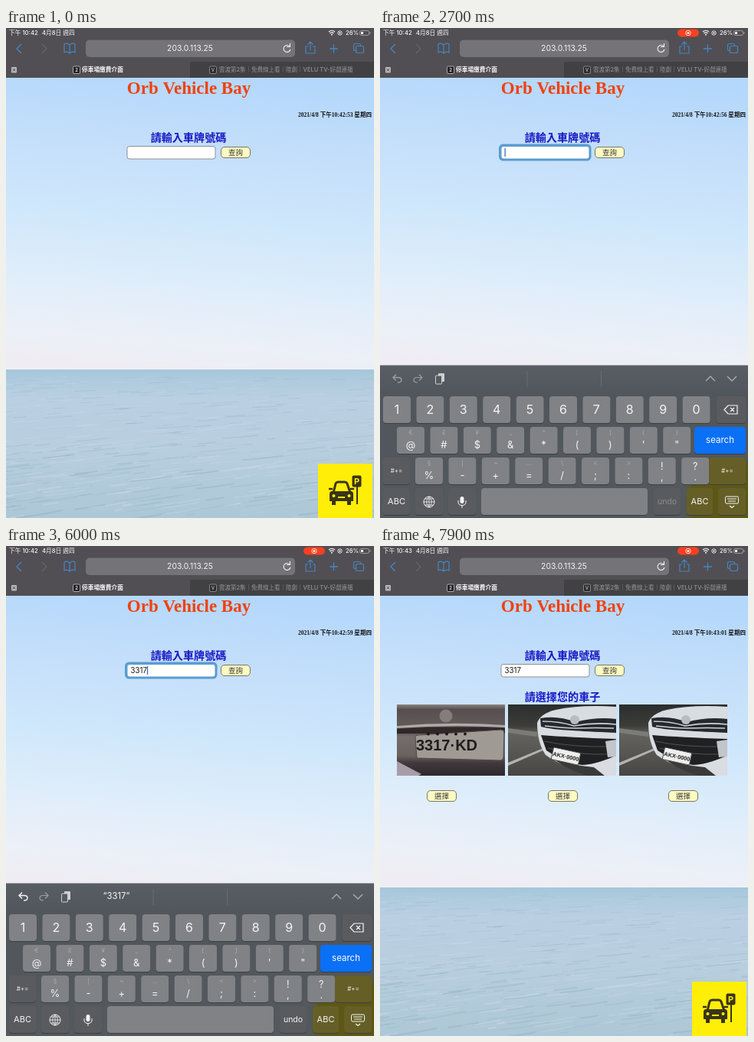
Recreate the animation shown at these times as an HTML page with a canvas. Size 480x640 px, loop 8000 ms.

```html
<!DOCTYPE html>
<html lang="zh-Hant">
<head>
<meta charset="utf-8">
<style>
html, body { margin: 0; width: 100%; height: 100%; overflow: hidden; background: #555; }
canvas { display: block; width: 480px; height: 640px; }
</style>
</head>
<body>
<canvas id="stage" width="480" height="640"></canvas>
<script>
const canvas = document.getElementById('stage');
let g = canvas.getContext('2d');
const SANS = 'Inter, "Noto Sans CJK TC", "Noto Sans CJK", sans-serif';
const SERIF = '"Liberation Serif", "Noto Sans CJK TC", "Noto Sans CJK", serif';
const PLATE = '"Liberation Sans", sans-serif';
const BAR = '#514f53', KEY = '#818286', DARK_KEY = '#5a5b5f', LIGHT = '#f5f5f7',
      BLUE = '#1818c4', YELLOW = '#ffee08', FOCUS_RING = '#5a9ccf';

// Event times in ms; the picture advances in steps of STEP
const LOOP = 8000, STEP = 100, RECORD = 500, FOCUS = 1650, SYMBOLS = 2700,
      TYPED = [4000, 4400, 4900, 5400], SEARCH = 6300, RESULT = 6700;

function text(s, x, y, size, color, align = 'center', weight = 400, family = SANS) {
  g.font = `${weight} ${size}px ${family}`;
  g.textAlign = align;
  g.textBaseline = 'middle';
  g.fillStyle = color;
  g.fillText(s, x, y);
}
function rect(x, y, w, h, color) {
  g.fillStyle = color;
  g.fillRect(x, y, w, h);
}
function round(x, y, w, h, r, fill, stroke, lw = 1) {
  g.beginPath();
  g.roundRect(x, y, w, h, r);
  if (fill) { g.fillStyle = fill; g.fill(); }
  if (stroke) { g.strokeStyle = stroke; g.lineWidth = lw; g.stroke(); }
}
function path(d, stroke, lw = 1, fill) {
  const p = new Path2D(d);
  if (fill) { g.fillStyle = fill; g.fill(p); }
  if (stroke) { g.strokeStyle = stroke; g.lineWidth = lw; g.stroke(p); }
}
const shape = (d, fill) => path(d, null, 0, fill);
function circle(x, y, r, fill, stroke, lw = 1) {
  g.beginPath();
  g.arc(x, y, r, 0, Math.PI * 2);
  if (fill) { g.fillStyle = fill; g.fill(); }
  if (stroke) { g.strokeStyle = stroke; g.lineWidth = lw; g.stroke(); }
}
function gradient(x0, y0, x1, y1, stops) {
  const gr = g.createLinearGradient(x0, y0, x1, y1);
  for (const [at, color] of stops) gr.addColorStop(at, color);
  return gr;
}
function cached(draw) {
  const layer = document.createElement('canvas');
  layer.width = 480;
  layer.height = 640;
  const main = g;
  g = layer.getContext('2d');
  draw();
  g = main;
  return layer;
}

function drawScenery() {
  rect(0, 65, 480, 382, gradient(240, 65, 208, 447, [
    [0, '#b4d8fb'], [.25, '#c5dffb'], [.5, '#d0e8fb'], [.75, '#e2eefa'],
    [.9, '#ecf0f8'], [1, '#efedf3']
  ]));
  rect(0, 446, 480, 194, gradient(0, 446, 0, 640, [
    [0, '#a5c6db'], [.07, '#aecbde'], [.2, '#bacfe2'], [.5, '#b8cfdf'], [1, '#acc7d5']
  ]));
  let seed = 11;
  const rnd = () => (seed = (seed * 16807) % 2147483647) / 2147483647;
  const tones = ['#ccd8ea', '#c3d5e5', '#a0bdd0', '#98b3c5', '#b3c8dc'];
  g.globalAlpha = .5;
  for (let i = 0; i < 620; i++) {
    const d = rnd(), y = 455 + d * 185, x = rnd() * 540 - 60;
    const len = 10 + rnd() * (18 + d * 44), rise = len * (.03 + d * .13);
    path(`M${x} ${y} q${len / 2} ${-rise * .3} ${len} ${-rise}`,
      tones[Math.floor(rnd() * tones.length)], .6 + d * 2 * rnd());
  }
  g.globalAlpha = 1;
}

function drawBadge() {
  const ink = '#3a3418';
  rect(407, 569, 71, 71, YELLOW);
  path('M427 607 L430 595 Q431 593 433 593 H442 Q444 593 445 595 L449 607', ink, 3);
  shape('M425 605 H450 Q453 605 453 609 V618 H450 V623 H445 V618 H430 V623 H425 V618 H422 V609 Q422 605 425 605 Z', ink);
  path('M421 602 h5 M449 602 h5', ink, 2.5);
  circle(427.5, 611, 2, YELLOW);
  circle(447.5, 611, 2, YELLOW);
  rect(433, 612, 9, 2, YELLOW);
  rect(457, 597, 2, 25, ink);
  round(451.5, 584.5, 12, 15, 2, ink);
  text('P', 457.5, 592.5, 11, YELLOW, 'center', 700);
}

function drawChrome() {
  const tint = '#4585c4';
  rect(0, 0, 480, 65, BAR);
  rect(240, 44, 240, 21, '#414144');
  round(104, 15.5, 273, 22.5, 5, '#737378');
  text('203.0.113.25', 240, 27, 10.3, LIGHT);
  path('M370 24 A4.5 4.5 0 1 0 371 28 M370.5 20 V24.5 H366', LIGHT, 1.1);
  path('M20 21 L14 27 L20 33', tint, 1.4);
  path('M47 21 L53 27 L47 33', '#66666b', 1.2);
  path('M83 22 Q79 19 76 21 V32 Q80 30 83 33 Q86 30 90 32 V21 Q87 19 83 22 V33', tint, 1.2);
  path('M394 24 H391 V33 H403 V24 H400 M397 29 V18 M393.5 21.5 L397 18 L400.5 21.5', tint, 1.2);
  path('M422 27 H433 M427.5 21.5 V32.5', tint, 1.3);
  round(453.5, 20.5, 9, 9, 2, null, tint, 1.2);
  round(456.5, 23.5, 10, 9, 2, BAR, tint, 1.2);
  round(7, 51, 7, 7.5, 1, '#b9b9bb');
  path('M8.8 53 l3.4 3.4 m0 -3.4 l-3.4 3.4', '#444', 1);
  round(87.5, 50, 9, 9.5, 1.5, '#222225', '#c4c4c6', .8);
  text('2', 92, 55, 6, '#eee', 'center', 600);
  text('停車場繳費介面', 99, 55, 7.7, '#fafafa', 'left', 700);
  round(265.5, 50, 9, 9.5, 1.5, '#2c2c2f', '#9a9a9d', .8);
  text('V', 270, 55, 6, '#b3b3b5', 'center', 600);
  text('雲渡第2集｜免費線上看｜陸劇｜VELU TV-好戲連播', 278, 55, 7.5, '#949497', 'left', 500);
}

function drawStatus(t) {
  text(`下午 10:${t < 6700 ? 42 : 43}`, 4, 6.5, 7.7, LIGHT, 'left', 500);
  text('4月8日 週四', 47, 6.5, 7.7, LIGHT, 'left', 500);
  if (t >= RECORD) {
    round(388, 1.5, 28, 10, 5, '#fa4020');
    circle(402, 6.5, 3.2, null, '#ffe6de', .9);
    circle(402, 6.5, 1.6, '#ffe6de');
  }
  path('M421 5 Q425 1.5 429 5 M422.5 7 Q425 4.8 427.5 7', LIGHT, 1.2);
  circle(425, 8.8, 1, LIGHT);
  circle(435.5, 6.5, 2.7, null, LIGHT, .9);
  rect(434.5, 5.5, 2, 2, LIGHT);
  text('26%', 443, 6.5, 7.7, LIGHT, 'left', 500);
  round(461.5, 3.5, 12, 6, 1.8, null, '#b0b0b4', .8);
  rect(463, 5, 3, 3, LIGHT);
  rect(474.5, 5.5, 1, 2, '#b0b0b4');
}

function button(x, y, label) {
  round(x + .5, y + .5, 38, 14, 4.5, '#fdfac2', '#77776a');
  text(label, x + 19.5, y + 8, 9.5, '#3c3a3c', 'center', 500);
}

function drawRear() {
  rect(0, 0, 141, 93, gradient(0, 0, 0, 93, [
    [0, '#8a8281'], [.07, '#574f4f'], [.28, '#625a59'], [.33, '#443c3d'],
    [.45, '#756d6b'], [.72, '#6a6261'], [.82, '#41383b'], [1, '#2e282b']
  ]));
  shape('M0 28 Q70 22 141 27 V30 Q70 26 0 31 Z', '#b1aaa7');
  shape('M0 32 Q70 28 141 31 V38 H0 Z', '#2e282a');
  circle(64, 15, 8.5, '#857d7b');
  path('M24 43 Q24 40 28 40 L136 33 Q140 33 140 37 L139 69 Q139 73 135 73 L26 70 Z', '#4f4848', 1, '#a09a94');
  for (let i = 0; i < 5; i++) circle(41 + i * 12, 38.5, 2, '#1d191b');
  text('3317·KD', 25, 54, 20, '#201d1f', 'left', 700, PLATE);
  shape('M0 74 L32 91 L28 93 H0 Z', '#a79ca8');
}

function drawFront() {
  rect(0, 0, 141, 93, gradient(0, 0, 0, 93, [
    [0, '#2b2e2d'], [.3, '#3c3d3a'], [.42, '#63625f'], [1, '#474644']
  ]));
  shape('M0 31 L38 36 V42 L0 37 Z', '#7c7b77');
  shape('M0 76 L46 57 L48 59 L0 80 Z', '#b3b2af');
  // Body, grille slats, bumper and lower intake
  shape('M38 24 Q42 12 62 7 Q95 0 141 3 V93 H109 Q72 82 49 66 Q38 50 38 24 Z', '#d9dce0');
  shape('M42 18 Q65 14 88 23 Q115 16 141 19 V37 Q98 35 84 34 Q58 33 43 29 Z', '#26292d');
  path('M45 22 Q68 22 86 28 Q112 23 141 26 M48 28 Q75 31 88 31 Q116 30 138 31', '#ccd3d9', 1.6);
  circle(87, 20, 6, '#b9bdc1');
  shape('M43 40 Q80 43 141 45 L138 68 Q112 79 96 79 Q68 73 50 60 Z', '#202123');
  path('M47 48 Q84 56 134 55 M52 57 Q86 66 132 65', '#515254', 1);
  shape('M56 68 Q82 80 112 82 L126 93 H103 Q72 83 56 68 Z', '#3a3a3a');
  shape('M127 48 L141 46 V68 L130 69 Z', '#c2c5c9');
  g.save();
  g.translate(75.5, 67.5);
  g.rotate(.21);
  round(-18, -8, 36, 16, 1, '#eeeeec', '#4b4b4b');
  text('AKX·0000', 0, 1, 7.4, '#1d1d1d', 'center', 700, PLATE);
  g.restore();
}

function photo(x, draw) {
  g.save();
  g.translate(x, 207);
  g.beginPath();
  g.rect(0, 0, 141, 93);
  g.clip();
  draw();
  g.restore();
}

function drawResults() {
  text('請選擇您的車子', 238, 197.5, 14.1, BLUE, 'center', 700);
  photo(22, drawRear);
  photo(167, drawFront);
  photo(312, drawFront);
  [61, 219, 376].forEach(x => button(x, 319, '選擇'));
}

function drawPage(t, typed) {
  text('Orb Vehicle Bay', 238.5, 80.5, 23, '#f0410f', 'center', 700, SERIF);
  const sec = 53 + Math.floor((t + 300) / 1000);
  const clock = `10:${42 + Math.floor(sec / 60)}:${String(sec % 60).padStart(2, '0')}`;
  text(`2021/4/8 下午${clock} 星期四`, 477, 114, 7.55, '#161616', 'right', 700, SERIF);
  text('請輸入車牌號碼', 238, 143.7, 14.1, BLUE, 'center', 700);
  const focused = t >= FOCUS && t < SEARCH;
  if (focused) round(156.5, 153, 117.5, 19, 4, null, FOCUS_RING, 3);
  round(158, 154.5, 115, 16.5, 3, '#fff', focused ? FOCUS_RING : '#8f8f90');
  text(typed, 162.5, 163, 9.7, '#181818', 'left');
  if (focused) {
    const x = 162.5 + g.measureText(typed).width;
    rect(x, 157, 1.3, 11, '#4168c8');
  }
  button(280, 155, '查詢');
  if (t >= RESULT) drawResults();
}

function key(x, y, w, fill, label, size = 16, color = LIGHT, dy = 0) {
  round(x, y + 1, w, 35, 4, '#3d3f42');
  round(x, y, w, 35, 4, fill);
  if (label) text(label, x + w / 2, y + 18 + dy, size, color);
}
function row(chars, hints, x, y, size) {
  [...chars].forEach((c, i) => {
    const kx = x + i * 43.4, hint = hints[i];
    key(kx, y, 36, KEY, c, size, LIGHT, hint ? 6 : 0);
    if (hint) text(hint, kx + 18, y + 8, 8, '#a9aaad');
  });
}
function shiftArrow(x, y) {
  shape(`M${x} ${y - 7} l7.5 7.5 h-4 v6 h-7 v-6 h-4 Z`, '#111');
}

function drawToolbar(typed) {
  const dim = '#9a9da1', on = typed ? LIGHT : dim;
  path('M21 452.5 L17 456.5 L21 460.5 M17 456.5 H24 Q28 456.5 28 460 Q28 463 23 463', on, 1.4);
  path('M51 452.5 L55 456.5 L51 460.5 M55 456.5 H48 Q44 456.5 44 460 Q44 463 49 463', dim, 1.2);
  round(76, 451, 8, 11, 1, '#cfd0d2');
  round(72.5, 454, 8, 11, 1, '#565b60', '#cfd0d2');
  rect(191.5, 448, 1, 21, '#676c71');
  rect(288, 448, 1, 21, '#676c71');
  if (typed) text(`“${typed}”`, 144, 458, 11.3, LIGHT);
  path('M425 461 L431 455 L437 461', '#a5a8ac', 1.5);
  path('M453 455 L459 461 L465 455', '#a5a8ac', 1.5);
}

function drawKeys(symbols, typed) {
  if (symbols) {
    row('1234567890', '', 4, 481, 16);
    row('@#$&*()\'"', '€£¥_^[]{}', 22, 521, 13);
    row('%-+=/;:', '§|~…\\<>', 46, 561, 13);
  } else {
    row('QWERTYUIOP', '1234567890', 4, 481, 16);
    row('ASDFGHJKL', '@#$&*()\'"', 22, 521, 16);
    row('ZXCVBNM', '%-+=/;:', 46, 561, 16);
  }
  [['!', ','], ['?', '.']].forEach(([top, low], i) => {
    const x = 46 + (7 + i) * 43.4;
    key(x, 561, 36, KEY);
    text(top, x + 18, 573, 12.5, LIGHT);
    text(low, x + 18, 587, 12.5, LIGHT);
  });
  key(438.5, 481, 38.5, DARK_KEY);
  path('M449 498.5 L454 493 H466 V504 H454 Z M457 496 l5 5 m0 -5 l-5 5', LIGHT, 1.2);
  key(410, 521, 67, '#0a70f5', 'search', 11.5, '#fff');
  const end = '#655f27';
  if (symbols) {
    key(4, 561, 35, DARK_KEY, '#+=', 8);
    key(429, 561, 48, end, '#+=', 8);
  } else {
    key(4, 561, 35, '#f1f1ee');
    key(429, 561, 48, '#f1f1e6');
    shiftArrow(21.5, 579);
    shiftArrow(453, 579);
  }
  const mode = symbols ? 'ABC' : '.?123';
  key(4, 601, 35, DARK_KEY, mode, symbols ? 11 : 9.5);
  key(46, 601, 36, DARK_KEY);
  circle(64, 619, 7, null, LIGHT);
  path('M57 619 H71 M64 612 V626 M64 612 Q57 619 64 626 Q71 619 64 612 M58.5 615 H69.5 M58.5 623 H69.5', LIGHT, .8);
  key(89, 601, 36, DARK_KEY);
  round(104.5, 612, 5, 9, 2.5, LIGHT);
  path('M102 617 V619 Q102 623.5 107 623.5 Q112 623.5 112 619 V617 M107 623.5 V627', LIGHT, 1);
  key(132, 601, 217, KEY);
  let hide = 448;
  if (symbols) {
    key(357, 601, 35, DARK_KEY, 'undo', 10.5, typed ? LIGHT : '#8b8c90');
    key(400, 601, 34, end, 'ABC', 11);
    key(441, 601, 36, end);
    hide = 459;
  } else {
    key(357, 601, 55, DARK_KEY, mode, 9.5);
    key(420, 601, 57, end);
  }
  round(hide - 8.5, 612, 17, 9, 1.5, null, LIGHT);
  path(`M${hide - 6} 615 h12 M${hide - 5} 618 h10`, LIGHT, 1.2);
  path(`M${hide - 3} 624 l3 2.5 l3 -2.5`, LIGHT, 1.2);
}

function drawKeyboard(t, typed) {
  if (t < FOCUS || t >= SEARCH + 400) return;
  const up = 1 - Math.min(1, (t - FOCUS) / 420);
  const down = Math.max(0, (t - SEARCH) / 400);
  const dy = 200 * (t < SEARCH ? up ** 3 : 1 - (1 - down) ** 3);
  g.save();
  g.beginPath();
  g.rect(0, 440.5 + dy, 480, 200);
  g.clip();
  rect(0, 440, 480, 200, gradient(0, 440, 0, 640, [[0, '#585e63'], [.2, '#50565b'], [1, '#53595d']]));
  // Yellow badge glowing through the translucent panel
  g.filter = 'blur(5px)';
  rect(405, 568, 85, 85, '#5d5716');
  g.filter = 'none';
  g.translate(0, dy);
  drawToolbar(typed);
  drawKeys(t >= SYMBOLS, typed);
  g.restore();
}

const backdrop = cached(() => { drawScenery(); drawBadge(); drawChrome(); });

function frame(now) {
  const t = Math.floor((now % LOOP) / STEP) * STEP;
  const typed = '3317'.slice(0, TYPED.filter(at => t >= at).length);
  g.drawImage(backdrop, 0, 0);
  drawStatus(t);
  drawPage(t, typed);
  drawKeyboard(t, typed);
  requestAnimationFrame(frame);
}
frame(0);
</script>
</body>
</html>
```
